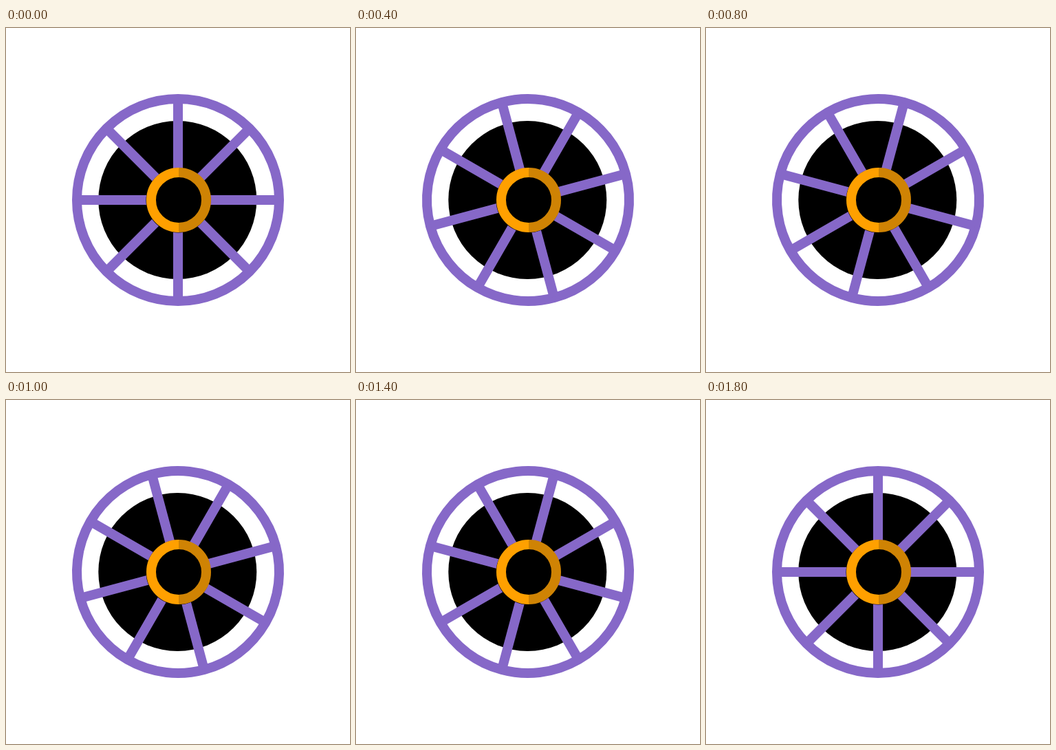
Recreate the animation shown at these times as an HTML page. Size 500 px wide and 500 px high, loop 2 s.

```html
<!DOCTYPE html>
<html lang="en">
<head>
<meta charset="utf-8">
<title>Wheel</title>
<style>
html, body { margin: 0; width: 100%; height: 100%; overflow: hidden; background: #fff; }
svg { display: block; width: 100%; height: 100%; }
</style>
</head>
<body>
<svg viewBox="0 0 500 500">
  <circle cx="249.3" cy="250" r="115"/>
  <g id="wheel" fill="none" stroke="#8668c8" stroke-width="14">
    <circle cx="250" cy="250" r="147"/>
    <path id="spokes"/>
  </g>
  <circle cx="250.5" cy="250.5" r="47"/>
  <g fill="none" stroke-width="14">
    <path d="M251 210A40 40 0 0 0 251 290" stroke="#ffa000"/>
    <path d="M251 210A40 40 0 0 1 251 290" stroke="#cf8304"/>
  </g>
</svg>
<script>
const LOOP = 2000, STEP = 200, TURN = 15;
const wheel = document.getElementById("wheel");

let d = "";
for (let i = 0; i < 4; i++) {
  const a = i * Math.PI / 4, x = 146 * Math.cos(a), y = 146 * Math.sin(a);
  d += `M${250 - x} ${250 - y}L${250 + x} ${250 + y}`;
}
document.getElementById("spokes").setAttribute("d", d);

function draw() {
  const step = Math.floor(performance.now() % LOOP / STEP);
  wheel.setAttribute("transform", `rotate(${step * TURN} 250 250)`);
  requestAnimationFrame(draw);
}
draw();
</script>
</body>
</html>
```
